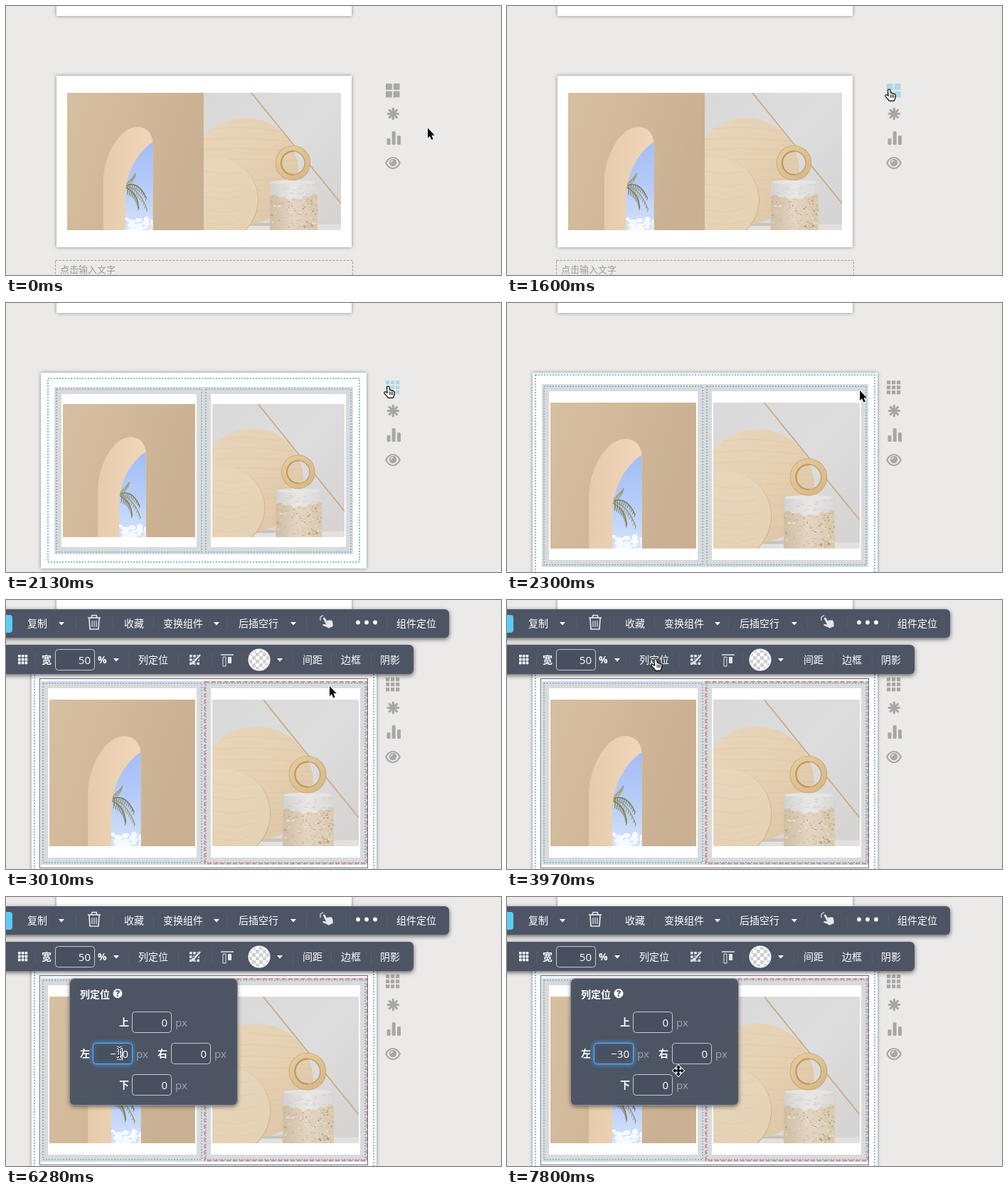
An HTML page with a canvas that plays this animation: 696x378 px, repeating every 8 s.

```html
<!DOCTYPE html>
<html lang="zh">
<head>
<meta charset="utf-8">
<style>
html, body { margin: 0; width: 100%; height: 100%; overflow: hidden; background: #ebeae8 }
canvas { display: block }
</style>
</head>
<body>
<canvas id="stage" width="696" height="378"></canvas>
<script>
const c = document.getElementById('stage').getContext('2d');
const FONT = '"Open Sans", "Noto Sans CJK SC", "Noto Sans CJK", sans-serif';
const GRAY = '#a7a7a5', SLATE = '#4d5565';
const HAND = new Path2D('M-1.5 .8C-1.5-.8 1-.8 1.3.8L2 6C2.5 5 4.3 5 4.6 6.3C5.5 5.5 7 6 7 7C8 6.5 9 7 9 8.3L8.6 12L7 16H0L-1 14L-5.5 9.5C-6 8-4.5 7.5-3 8.6L-.8 10Z');
const ARROW = new Path2D('M0 0V14L3 11.2L5.3 16.5L7.6 15.5L5.3 10.2H9.7Z');
const MOVE = new Path2D('M0-8L3.2-4.3H1.3V-1.3H4.3V-3.2L8 0L4.3 3.2V1.3H1.3V4.3H3.2L0 8L-3.2 4.3H-1.3V1.3H-4.3V3.2L-8 0L-4.3-3.2V-1.3H-1.3V-4.3H-3.2Z');

const mix = (a, b, p) => a + (b - a) * p;

// Number of steps taken at time t when n steps are spread from a to b.
const steps = (t, a, b, n) =>
  t < a ? 0 : Math.min(n, Math.floor((t - a) / (b - a) * (n - 1) + .06) + 1);

const curve = (a, m, b, p) =>
  [0, 1].map(i => a[i] * (1 - p) ** 2 + 2 * p * (1 - p) * m[i] + b[i] * p * p);

function rect(x, y, r, b, fill) {
  c.fillStyle = fill;
  c.fillRect(x, y, r - x, b - y);
}

function box(x, y, r, b, radius, fill, stroke) {
  c.beginPath();
  c.roundRect(x, y, r - x, b - y, radius);
  if (fill) { c.fillStyle = fill; c.fill(); }
  if (stroke) { c.strokeStyle = stroke; c.lineWidth = 1; c.stroke(); }
}

function frame(x, y, r, b, color, width, dash = []) {
  c.strokeStyle = color;
  c.lineWidth = width;
  c.setLineDash(dash);
  c.strokeRect(x, y, r - x, b - y);
  c.setLineDash([]);
}

function disc(x, y, r, fill, ry = r) {
  c.beginPath();
  c.ellipse(x, y, r, ry, 0, 0, 7);
  c.fillStyle = fill;
  c.fill();
}

function line(color, width, ...pts) {
  c.beginPath();
  for (let i = 0; i < pts.length; i += 2) c.lineTo(pts[i], pts[i + 1]);
  c.strokeStyle = color;
  c.lineWidth = width;
  c.stroke();
}

function arc(x, y, r, from, to, color, width) {
  c.beginPath();
  c.arc(x, y, r, from, to);
  c.strokeStyle = color;
  c.lineWidth = width;
  c.stroke();
}

function shape(path, fill, grow = 0, edge) {
  const p = new Path2D(path);
  if (grow) { c.strokeStyle = edge; c.lineWidth = grow; c.stroke(p); }
  c.fillStyle = fill;
  c.fill(p);
}

function text(s, x, y, size = 14, color = '#fff', weight = 400, align = 'left') {
  c.font = `${weight} ${size}px ${FONT}`;
  c.textAlign = align;
  c.fillStyle = color;
  c.fillText(s, x, y);
}

function shadow(color, blur, y, draw) {
  c.save();
  c.shadowColor = color;
  c.shadowBlur = blur;
  c.shadowOffsetY = y;
  draw();
  c.restore();
}

function fade(x0, y0, x1, y1, ...colors) {
  const g = c.createLinearGradient(x0, y0, x1, y1);
  colors.forEach((k, i) => g.addColorStop(i / (colors.length - 1), k));
  return g;
}

// Runs draw in a clipped 193 x 193 picture space.
function picture(x, y, r, b, draw) {
  c.save();
  c.translate(x, y);
  c.scale((r - x) / 193, (b - y) / 193);
  c.beginPath();
  c.rect(0, 0, 193, 193);
  c.clip();
  draw();
  c.restore();
}

function archPicture() {
  rect(0, 0, 193, 193, fade(0, 0, 193, 70, '#d6c0a2', '#d1b898', '#c9b092'));
  shape('M51 193V125C51 88 74 48 99 48C112 48 121 57 121 72V193Z',
    fade(50, 0, 121, 0, '#e6cbac', '#f1d7bb'));
  c.save();
  c.clip(new Path2D('M82 193V148C82 108 103 81 121 69V193Z'));
  rect(80, 65, 123, 193, fade(0, 70, 0, 193, '#a3bdf5', '#b5ccfa', '#d5e4fb'));
  for (let i = 0; i < 16; i++)
    disc(84 + i * 29 % 39, 177 + i * 7 % 17, 3 + i % 4, '#f6f9fd', 2 + i % 3);
  c.lineCap = 'round';
  [[96, 114], [112, 148], [113, 164], [101, 162]].forEach(([x, y], i) => {
    const color = i % 2 ? '#7d7d57' : '#a09b72', bend = [100, 112 + i * 9];
    for (let j = 2; j <= 12; j++) {
      const p = j / 12, [fx, fy] = curve([80, 132], bend, [x, y], p);
      line(color, 1, fx, fy, fx - 1, fy + 9 - 6 * p);
    }
    c.beginPath();
    c.moveTo(80, 132);
    c.quadraticCurveTo(...bend, x, y);
    c.lineWidth = 1.4;
    c.stroke();
  });
  c.restore();
}

function podiumPicture() {
  rect(0, 0, 193, 193, fade(0, 0, 193, 193, '#d9d9d9', '#dedddd', '#d4d3d2'));
  rect(0, 185, 193, 193, '#e3e1de');
  disc(80, 185, 36, '#c8c2ba', 2);
  disc(58, 110, 75, fade(0, 40, 130, 170, '#e8d6bb', '#e5d0b2', '#dcc5a5'));
  c.save();
  c.beginPath();
  c.arc(58, 110, 75, 0, 7);
  c.clip();
  for (let i = 0; i < 9; i++)
    line('#d3b99455', 1, -10, 52 + i * 14, 50, 48 + i * 15, 135, 56 + i * 13);
  c.restore();
  disc(18, 150.5, 59, '#ceb48f');
  disc(17, 150, 59, fade(0, 90, 60, 193, '#e8d7bc', '#e5d1b4'));
  for (let i = 0; i < 5; i++)
    line('#d3b99455', 1, 0, 110 + i * 18, 30, 114 + i * 18, 56, 111 + i * 17);
  line('#c9ac88', 1.8, 67, 0, 193, 155.5);

  c.save();
  c.clip(new Path2D('M93 126C98 121 155 121 160 126V193H93Z'));
  rect(90, 120, 163, 193, fade(93, 0, 160, 0, '#d0bea4', '#e2d5c2', '#d9c9b0'));
  let seed = 7;
  const rnd = () => (seed = seed * 16807 % 2147483647) / 2147483647;
  for (let i = 0; i < 150; i++)
    disc(93 + rnd() * 67, 144 + rnd() * 49, .5 + rnd() * 1.3,
      ['#b69c7a', '#ebe1d2', '#c8b08e', '#d2bfa3'][i % 4], .4 + rnd() * .8);
  shape('M93 122H160V143L154 141L149 146L142 145L137 150L127 147L120 151L113 146L106 147L100 143L93 145Z',
    fade(93, 0, 160, 0, '#d3d2d0', '#e9e8e6', '#d9d8d6'));
  for (let i = 0; i < 16; i++)
    disc(94 + rnd() * 64, 128 + rnd() * 16, 2 + rnd() * 2, '#c9c8c688', .8);
  c.restore();
  disc(126, 125.5, 32, '#e6e5e3', 2.5);

  arc(125.5, 98.5, 20.3, 0, 7, '#bf9c6b', 8.6);
  arc(125.5, 98.5, 20.6, 0, 7, fade(105, 75, 145, 120, '#e6cc9e', '#d8b783'), 6.6);
  arc(125.5, 98.5, 16.4, 1.5, 4.8, '#bd9866', 2);
}

// card left, right, bottom; outline inset x, y; band left, top, right, bottom; gap; padding x, y
const POSES = [
  [71, 486, 339, 10, 8, 86, 122, 471, 315, 0, 0, 0],
  [49, 507, 373, 10, 8, 68, 118, 488, 353, 10, 2, 14],
  [36, 521, 398, 4, 3, 49, 114, 508, 371, 10, 2, 16]
];

function pose(k) {
  const [a, b, p] = k < 3 ? [0, 1, k / 3] : [1, 2, Math.min(1, (k - 3) / 2)];
  return POSES[a].map((v, i) => Math.round(mix(v, POSES[b][i], p)));
}

function page(t) {
  const k = steps(t, 1960, 2470, 7);
  const [l, r, b, ox, oy, gl, gt, gr, gb0, gap, px, py] = pose(k);
  const gb = gb0 + (k > 5 ? 1 : 0), dots = '#86bcd8', mid = 278;
  rect(0, 0, 696, 378, '#ebeae8');
  shadow('rgba(0,0,0,.42)', 5, 0, () => {
    rect(71, -20, 486, 14, '#fff');
    rect(l, 98, r, b, '#fff');
  });
  frame(69.5, b + 18.5, 487.5, b + 60, '#9b9b9b', 1, [3, 2]);
  text('点击输入文字', 76, b + 35.5, 13, '#9b9b9b');
  if (k) {
    frame(l + ox, 98 + oy, r - ox, b - 9, dots, 2, [2, 2]);
    rect(gl, gt, gr, gb, '#dadada');
    frame(gl + 3, gt + 3, 275, gb - 3, dots, 2, [2, 2]);
    frame(281, gt + 3, gr - 3, gb - 3, dots, 2, [2, 2]);
  }
  [[gl + gap, mid - gap, archPicture], [mid + gap, gr - gap, podiumPicture]].forEach(([x, e, draw]) => {
    rect(x, gt + gap, e, gb - gap, '#fff');
    picture(x + px, gt + gap + py, e - px, gb - gap - py, draw);
  });
  if (t >= 2830) frame(279.5, 115, 507.5, 370.5, '#d98787', 2, [6, 3]);
  if (t >= 3010) frame(47.5, 110.5, 508.5, 376.5, '#6a7080', 1);
  sideIcons(t, k);
}

function grid(x, y, n, size, pitch, color) {
  for (let i = 0; i < n * n; i++) {
    const gx = x + i % n * pitch, gy = y + Math.floor(i / n) * pitch;
    box(gx, gy, gx + size, gy + size, .5, color);
  }
}

function sideIcons(t, k) {
  const hover = steps(t, 1080, 1600, 7) >= 6 && k < 4;
  const color = hover ? '#add8e6' : GRAY;
  if (k) grid(534, 109, 3, 5.2, 7, color);
  else grid(534, 109, 2, 8.8, 10.7, color);
  c.lineCap = 'round';
  for (let i = 0; i < 4; i++) {
    const x = Math.cos(i * Math.PI / 4) * 7.3, y = Math.sin(i * Math.PI / 4) * 7.3;
    line(GRAY, 3.2, 544.3 - x, 151.5 - y, 544.3 + x, 151.5 + y);
  }
  c.lineCap = 'butt';
  box(535.5, 186, 540.5, 195, 1.5, GRAY);
  box(542.7, 176, 547.7, 195, 1.5, GRAY);
  box(550, 182, 555, 195, 1.5, GRAY);
  shape('M533 220.5C538 209 550 209 555 220.5C550 232 538 232 533 220.5Z', GRAY);
  shape('M535.5 220.5C540 211.5 548 211.5 552.5 220.5C548 229.5 540 229.5 535.5 220.5Z', '#ebeae8');
  disc(544, 220, 5.3, GRAY);
  arc(544, 220, 2.7, 3.1, 4.8, '#ebeae8', 1.4);
}

const caret = (x, y) => shape(`M${x - 4} ${y - 2}h8l-4 4.5z`, '#fff');

function field(x, y, value, focus) {
  const draw = () => box(x + .5, y + .5, x + 55.5, y + 29.5, 4, '#485060', focus ? '#5fb0f5' : '#c6c9d0');
  if (focus) shadow('#4aa3f5', 6, 0, draw); else draw();
  text(value, x + 50, y + 20.5, 15, '#fff', 400, 'right');
}

function toolbars(t) {
  shadow('rgba(0,0,0,.6)', 6, 2, () => {
    box(-20, 13, 623, 53, 6, SLATE);
    box(-20, 63, 573, 104, 6, SLATE);
  });
  [98, 150, 207, 311, 422, 478, 536].forEach(x => rect(x, 24, x + 1, 42, '#566070'));
  [41, 172, 242, 289, 331, 403, 457, 513].forEach(x => rect(x, 75, x + 1, 93, '#566070'));

  box(-10, 21, 9, 46, 4, '#5ccbfa');
  [['复制', 30], ['收藏', 166], ['变换组件', 221], ['后插空行', 327], ['组件定位', 549]]
    .forEach(([s, x]) => text(s, x, 38));
  [78, 296, 404].forEach(x => caret(x, 33));
  line('#e4e6ea', 1.7, 115, 25, 133, 25);
  line('#e4e6ea', 1.7, 120, 25, 121, 21.5, 127, 21.5, 128, 25);
  line('#e4e6ea', 1.7, 117, 26, 118, 41, 130, 41, 131, 26);
  [121, 124, 127].forEach(x => line('#e4e6ea', 1.2, x, 29, x, 38));
  c.save();
  c.translate(447, 25);
  c.rotate(-.4);
  shape(HAND, '#e4e6ea');
  c.restore();
  line('#e4e6ea', 1.2, 442, 29, 442, 24, 446, 21.5);
  [495, 507, 519].forEach(x => disc(x, 31.5, 2.9, '#fff'));

  grid(17, 77, 3, 3.6, 4.8, '#fff');
  text('宽', 50, 89, 14, '#fff', 700);
  field(69, 69, '50');
  text('%', 129, 89, 14, '#fff', 700);
  caret(155, 84);
  if (t >= 4230 && t < 5040) box(180, 72, 234, 96, 4, '#3a7f35');
  [['列定位', 186], ['间距', 417], ['边框', 471], ['阴影', 526]].forEach(([s, x]) => text(s, x, 89));
  grid(258, 77, 3, 3.6, 5.2, '#e4e6ea');
  line(SLATE, 5, 263, 89, 273, 78);
  line('#e4e6ea', 2.5, 265, 86, 273, 77);
  disc(263.5, 88, 2.4, '#e4e6ea');
  line('#e4e6ea', 1.5, 302, 77, 320, 77);
  box(305, 80, 309, 93, 0, null, '#e4e6ea');
  rect(312, 80, 317, 89, '#e4e6ea');

  disc(356, 84, 15.5, '#fff');
  c.save();
  c.beginPath();
  c.arc(356, 84, 14, 0, 7);
  c.clip();
  for (let i = 0; i < 36; i++) {
    const x = i % 6, y = Math.floor(i / 6);
    if ((x + y) % 2) rect(341 + x * 5, 69 + y * 5, 346 + x * 5, 74 + y * 5, '#cfcfcf');
  }
  c.restore();
  caret(385, 84);
}

function popup(t) {
  c.save();
  c.globalAlpha = .97;
  shadow('rgba(0,0,0,.6)', 6, 2, () => box(90, 115, 325, 292, 6, SLATE));
  c.restore();
  box(89.5, 114.5, 325.5, 292.5, 6, null, '#8b919d');
  text('列定位', 104, 142, 14, '#fff', 700);
  disc(157, 135.5, 6.5, '#fff');
  text('?', 157, 140, 12, SLATE, 800, 'center');
  const typed = t < 6190 ? '0' : t < 6280 ? '−0' : '−30';
  const focus = t >= 5040;
  [['上', 159, 161, '0'], ['左', 104, 205, typed, focus], ['右', 213, 205, '0'], ['下', 159, 249, '0']]
    .forEach(([s, x, y, value, on]) => {
      text(s, x, y + 20, 14, '#fff', 700);
      field(x + (s === '右' ? 19 : 18), y, value, on);
      text('px', x + (s === '右' ? 80 : 79), y + 20.5, 15, '#a0a5af');
    });
  const lit = t >= 5210 && t < 5570 || t >= 6010 && t < 6730 || t >= 7270 && t < 7630;
  if (lit) rect(163, 212, 164, 229, '#fff');
}

function pointer(t) {
  const rest = [593, 171.5], icon = [537.5, 118], top = [455, 121], button = [209, 84], input = [159.5, 219.5];
  if (t < 1960) {
    const n = steps(t, 1080, 1600, 7);
    return [n < 6 ? 'arrow' : 'hand', ...curve(rest, [500, 115], icon, n / 7)];
  }
  if (t < 3180) {
    const n = steps(t, 1960, 2470, 7);
    const x = n < 4 ? icon[0] : mix(icon[0], top[0], (n - 3) / 4);
    return [n < 4 ? 'hand' : 'arrow', x, n < 4 ? icon[1] : n < 6 ? 123 : top[1]];
  }
  if (t < 4410) {
    const n = steps(t, 3180, 3970, 10);
    return [n < 9 ? 'arrow' : 'hand', ...curve(top, [330, 20], button, n / 10)];
  }
  if (t < 7630) {
    const n = steps(t, 4410, 4860, 6), p = n / 6;
    return [n < 2 ? 'hand' : n < 5 ? 'arrow' : 'beam', mix(button[0], input[0], p), mix(button[1], input[1], p)];
  }
  const n = steps(t, 7630, 7800, 3);
  return [n < 2 ? 'beam' : 'move', mix(input[0], 241, n / 3), mix(input[1], 244, n / 3)];
}

function drawPointer(kind, x, y) {
  c.save();
  c.translate(x, y);
  c.lineJoin = 'round';
  if (kind === 'arrow') shape(ARROW, '#000', 1.8, '#fff');
  if (kind === 'move') shape(MOVE, '#000', 2, '#fff');
  if (kind === 'hand') {
    c.scale(.92, .92);
    shape(HAND, '#fff', 2.6, '#000');
    [2.3, 4.6, 6.8].forEach(i => line('#000', 1, i, 7, i, 12));
  }
  if (kind === 'beam') {
    const beam = new Path2D('M-3.5-8Q0-8 0-5V5Q0 8-3.5 8M3.5-8Q0-8 0-5M0 5Q0 8 3.5 8M-1.5 3H1.5');
    [['#fff', 3], ['#000', 1.2]].forEach(([color, width]) => {
      c.strokeStyle = color;
      c.lineWidth = width;
      c.stroke(beam);
    });
  }
  c.restore();
}

function draw(now) {
  const t = now % 8000;
  page(t);
  if (t >= 3010) toolbars(t);
  if (t >= 4230) popup(t);
  drawPointer(...pointer(t));
  requestAnimationFrame(draw);
}
requestAnimationFrame(draw);
</script>
</body>
</html>
```
